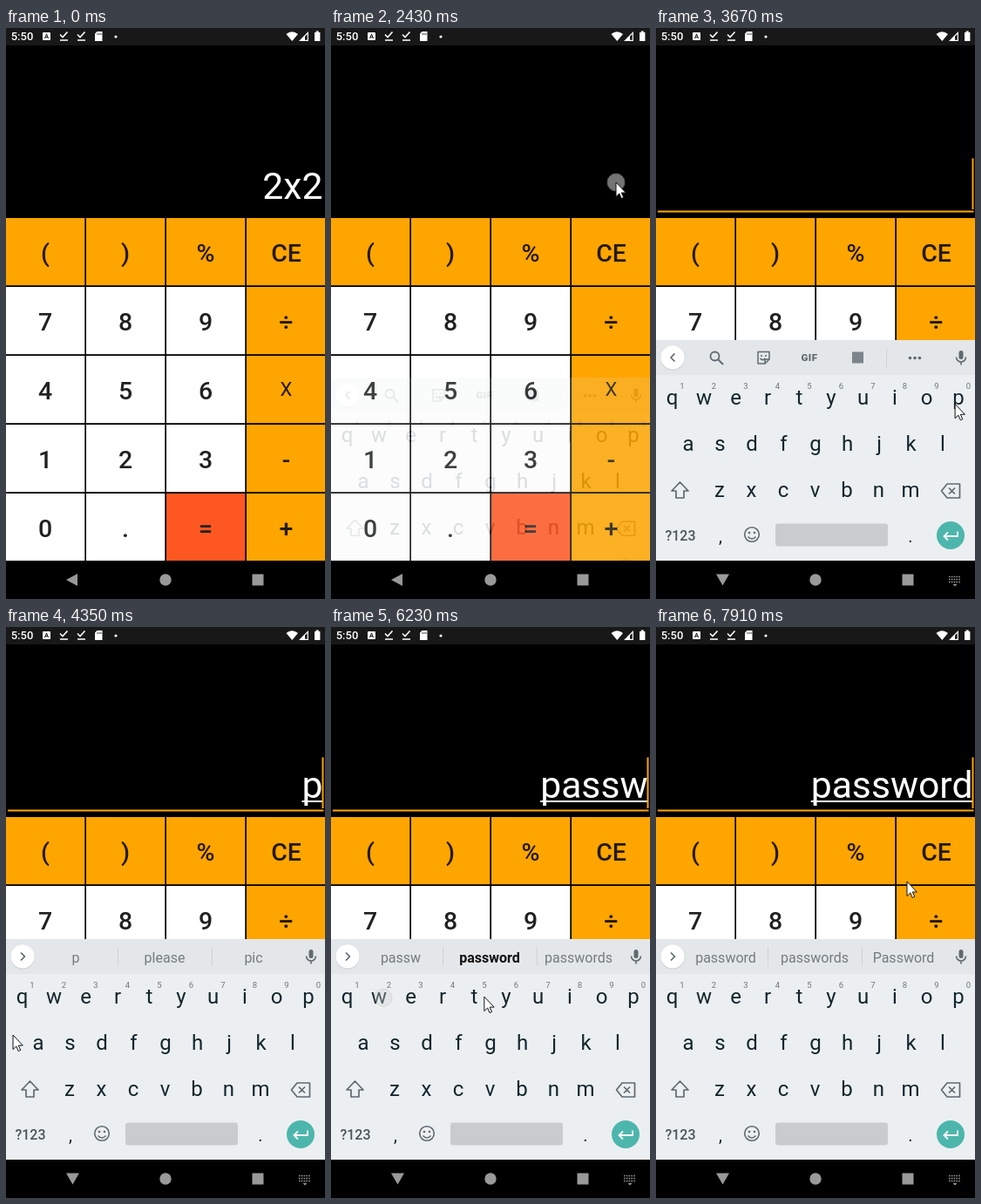
An HTML page for the animation above (8 s loop, 366 by 655 pixels).

```html
<!DOCTYPE html>
<html lang="en">
<head>
<meta charset="utf-8">
<title>Calculator</title>
<style>
html, body { margin: 0; width: 100%; height: 100%; overflow: hidden; background: #000; }
svg { display: block; width: 366px; height: 655px; font-family: Roboto, sans-serif; }
</style>
</head>
<body>
<svg id="stage" viewBox="0 0 366 655"></svg>
<script>
const LOOP = 8000, BLINK = 550, FADE = 450, FOCUS = 2440, RIGHT = 363.5;

const rect = (x, y, w, h, fill, more = '') =>
  `<rect x="${x}" y="${y}" width="${w}" height="${h}" fill="${fill}" ${more}/>`;
const text = (s, x, y, size, fill, more = '') =>
  `<text x="${x}" y="${y}" font-size="${size}" fill="${fill}" text-anchor="middle" ${more}>${s}</text>`;
const circle = (x, y, r, fill, more = '') => `<circle cx="${x}" cy="${y}" r="${r}" fill="${fill}" ${more}/>`;
const path = (d, fill, more = '') => `<path d="${d}" fill="${fill}" ${more}/>`;
const line = (d, color, w, more = '') => path(d, 'none', `stroke="${color}" stroke-width="${w}" ${more}`);
const group = (id, body, more = '') => `<g id="${id}" ${more}>${body}</g>`;

function statusBar() {
  const check = x => line(`M${x - 4} 7.5l3 3 5.500-6M${x - 4} 14h9`, '#fff', 1.6);
  return rect(0, 0, 366, 20, '#181818') +
    text('5:50', 18.5, 14, 13, '#fff', 'font-weight="500"') +
    rect(42, 5, 9, 9, '#fff', 'rx="1"') + text('A', 46.5, 12.300, 7.5, '#181818', 'font-weight="700"') +
    check(66) + check(86) +
    path('M104.500 4H110.500V15H102V6.500Z', '#fff') + line('M105 6v2M107 6v2M109 6v2', '#181818', 0.8) +
    circle(126, 10, 1.6, '#fff') +
    path('M321.500 7Q328 1.500 335 7L328.300 15Z', '#fff') +
    line('M337.500 14.300H346.300V5.500Z', '#fff', 1.2) + path('M337 15L343 9V15Z', '#fff') +
    path('M354 5h1.700v-1.500h3v1.500h1.700v10h-6.400Z', '#fff');
}

function keypad() {
  const rows = ['()%C', '789÷', '456X', '123-', '0.=+'];
  let out = '';
  rows.forEach((row, r) => [...row].forEach((ch, c) => {
    const orange = r === 0 || c === 3;
    const fill = ch === '=' ? '#ff5722' : orange ? '#ffa500' : '#fff';
    const x = c * 92, y = 218 + r * 79, cx = x + (c === 3 ? 45.5 : 45);
    out += rect(x, y, 90.300, 77.200, fill);
    out += ch === 'X'
      ? text('X', cx, y + 204 - 200 + 42, 22, '#231a08')
      : text(ch === 'C' ? 'CE' : ch, cx, y + 50, 28.5, orange ? '#231a08' : '#212121', 'font-weight="500"');
  }));
  return out;
}

function navBar() {
  const grey = '#999';
  return rect(0, 611, 366, 44, '#000') +
    group('backLeft', path('M69 633L82 626V640Z', grey)) +
    group('backDown', path('M69 626.500H84L76.500 639.500Z', grey) +
      line('M336 629.500h14M336 632.500h14M336 635.500h14', grey, 1.7, 'stroke-dasharray="1.6 1.2"') +
      path('M340.500 638h5l-2.500 2.500Z', grey)) +
    circle(183, 633, 6.700, grey) + rect(282.5, 626.5, 13, 13, grey);
}

const INK = '#13262e', ICON = '#5f6a70';
const SLOTS = [80, 182, 284];

function keyboard() {
  let out = rect(0, 358, 366, 254, '#eceff1') + rect(0, 358, 366, 40, '#e4e7e9');
  const letters = (row, x0, y) => [...row].forEach((ch, i) => {
    out += text(ch, x0 + i * 36.5, y, 24, INK);
  });
  letters('qwertyuiop', 18.5, 432);
  letters('asdfghjkl', 37, 485);
  letters('zxcvbnm', 73, 538);
  [...'1234567890'].forEach((n, i) => { out += text(n, 30 + i * 36.5, 414, 9.5, '#6c777c'); });

  const stroke = (d, w = 1.7) => line(d, ICON, w, 'stroke-linejoin="round"');
  out += stroke('M27.500 521L18 531H23V539H32V531H37Z');
  out += stroke('M334 523H348.500V539H334L327.500 531ZM336 527.500l7 7m0-7l-7 7');
  out += text('?123', 28, 587.5, 16, '#4a555b', 'font-weight="500"');
  out += text(',', 74, 590, 20, INK) + text('.', 292, 590, 20, INK);
  out += circle(110, 581, 8.3, 'none', `stroke="${ICON}" stroke-width="1.600"`) +
    circle(107, 579, 1.3, ICON) + circle(113, 579, 1.3, ICON) + stroke('M105.500 583.500Q110 588.500 114.500 583.500', 1.5);
  out += rect(137, 568.5, 129, 26, '#c9cccf', 'rx="3"');
  out += circle(338, 582, 16, '#4db6ac') + line('M346 577.500V583H331M335 578.500L330.500 583L335 587.500', '#fff', 1.8);

  out += circle(19, 379, 13.800, '#cfd3d5') + circle(19, 378, 13.5, '#fff');
  out += rect(347.5, 370, 5, 10, ICON, 'rx="2.5"') + stroke('M344.500 377.500a5.500 5.500 0 0 0 11 0M350 383v3.500', 1.6);

  out += group('tools',
    stroke('M21.500 373.500L17 378L21.500 382.500') +
    circle(67.5, 376.5, 5, 'none', `stroke="${ICON}" stroke-width="1.800"`) + stroke('M71 380l6 6', 2) +
    stroke('M117 371.500H130V380L125 385H117ZM125 385V380H130M119.500 379q3 3.500 5.500 0', 1.5) +
    circle(121, 376, 1, ICON) + circle(126, 376, 1, ICON) +
    text('GIF', 176, 382, 11.5, ICON, 'font-weight="900" letter-spacing="0.5"') +
    rect(225, 371.5, 13, 13, '#7b858a') +
    rect(264, 368, 1, 21, '#cdd2d4') +
    [291.5, 297, 302.5].map(x => circle(x, 378.500, 1.8, ICON)).join(''));

  out += group('words',
    stroke('M17 373.500L21.500 378L17 382.500') +
    rect(128, 367, 1, 22, '#cdd2d4') + rect(236, 367, 1, 22, '#cdd2d4') +
    SLOTS.map((x, i) => text('', x, 384.5, 16, '#747b7f', `id="word${i}"`)).join(''));
  return out;
}

const popup = rect(-19, -84, 38, 106, '#777', 'rx="4" opacity="0.250" transform="translate(0 1.5)"') +
  rect(-18.5, -84, 37, 105, '#c9cbcd', 'rx="3"') +
  text('', -1, -49, 24, '#444b4f', 'id="popChar"') + text('…', 10.5, -39, 9, '#444b4f');

const arrow = path('M0 0V16.500L3.800 12.900L6.200 18.500L8.700 17.400L6.300 12H11.300Z', '#fff',
  'stroke="#111" stroke-width="1" stroke-linejoin="round"');

document.getElementById('stage').innerHTML =
  rect(0, 0, 366, 655, '#000') + statusBar() +
  `<text id="entry" x="${RIGHT}" y="196" font-size="42.700" fill="#fff" text-anchor="end"></text>` +
  rect(0, 199, 0, 2, '#fff', 'id="under"') +
  group('focus', rect(2, 209.5, 362.5, 2, '#ffa500') + rect(362.5, 149.5, 2, 58.5, '#ffa500', 'id="caret"')) +
  keypad() + group('keys', keyboard()) + navBar() +
  group('pop', popup) +
  group('press', circle(0, 0, 14, '#f4ea3e', 'opacity="0.850"') + circle(0, 0, 10, 'none', 'stroke="#d8cd3c" stroke-width="1"')) +
  group('release', circle(0, 0, 10, '#d4d4d4', 'stroke="#a8a8a8" stroke-width="1"')) +
  group('mouse', arrow);

const $ = {};
document.querySelectorAll('[id]').forEach(e => { $[e.id] = e; });
const show = (e, on) => e.setAttribute('display', on ? 'inline' : 'none');
const move = (e, x, y) => e.setAttribute('transform', `translate(${x} ${y})`);

// Pointer stops: time, x, y
const stops = [
  [310, 342, 612], [430, 341, 520], [550, 335, 390], [670, 324, 275], [770, 320, 245], [1770, 320, 244],
  [1960, 324, 205], [2120, 327, 177], [2960, 327, 177], [3180, 304, 255], [3380, 300, 370],
  [3540, 330, 455], [3700, 346, 426], [3900, 346, 426], [4060, 240, 445], [4220, 70, 464],
  [4340, 8, 468], [4470, 8, 468], [4690, 27, 471], [4770, 32, 476], [4890, 32, 477],
  [5020, 75, 479], [5480, 76, 479], [5570, 72, 465], [5700, 61, 428], [5990, 60, 425],
  [6220, 170, 424], [6480, 308, 426], [6700, 309, 426], [6930, 121, 425], [7120, 121, 425],
  [7290, 110, 476], [7480, 110, 477], [7620, 165, 425], [7780, 250, 330], [7900, 288, 292]
];

// Clicks: time down, time up, text afterwards, popup letter, popup x, popup y
const clicks = [
  [1250, 1400, ''], [2180, 2290, ''],
  [3730, 3880, 'p', 'p', 346.5, 424], [4770, 4880, 'pa', 'a', 37, 477],
  [5020, 5110, 'pas', 's', 73.5, 477], [5180, 5260, 'pass', 's', 73.5, 477],
  [5850, 5970, 'passw'], [6570, 6690, 'passwo', 'o', 310.5, 424],
  [6960, 7110, 'passwor', 'r', 128.5, 424], [7310, 7465, 'password', 'd', 110, 477]
];

const guesses = {
  p: 'please pic', pa: 'pay part', pas: 'pass past', pass: 'password passed',
  passw: 'password passwords', passwo: 'password passwords', passwor: 'password passwords',
  password: 'passwords Password'
};

function pointer(t) {
  const i = stops.findIndex(s => s[0] > t);
  if (i < 0) return stops[stops.length - 1].slice(1);
  const [t0, x0, y0] = stops[Math.max(0, i - 1)], [t1, x1, y1] = stops[i];
  const k = t1 > t0 ? (t - t0) / (t1 - t0) : 0;
  return [x0 + (x1 - x0) * k, y0 + (y1 - y0) * k];
}

function draw(t) {
  const last = clicks.filter(c => c[1] <= t).pop();
  const held = clicks.find(c => c[0] <= t && t < c[1]);
  const typed = last ? last[2] : '2x2';

  $.entry.textContent = typed;
  const composing = typed && last;
  show($.under, composing);
  if (composing) {
    const w = $.entry.getComputedTextLength();
    $.under.setAttribute('x', RIGHT - w);
    $.under.setAttribute('width', w);
  }

  const focused = t >= FOCUS;
  show($.focus, focused);
  const since = t - Math.max(FOCUS, last ? last[1] : 0);
  show($.caret, focused && Math.floor(since / BLINK) % 2 === 0);
  show($.backLeft, !focused);
  show($.backDown, focused);

  const left = 1 - Math.min(1, Math.max(0, (t - 2400) / 300));
  show($.keys, left < 1);
  $.keys.setAttribute('opacity', 1 - left ** 1.5);
  move($.keys, 0, 60 * left ** 3);

  show($.tools, !composing);
  show($.words, composing);
  if (composing) {
    [typed, ...guesses[typed].split(' ')].forEach((word, i) => {
      const strong = i === 1 && /^passw(o|or)?$/.test(typed);
      const e = $['word' + i];
      e.textContent = word;
      e.setAttribute('font-weight', strong ? 700 : 400);
      e.setAttribute('fill', strong ? '#111' : '#747b7f');
    });
  }

  show($.pop, held && held[3]);
  if (held && held[3]) {
    $.popChar.textContent = held[3];
    move($.pop, held[4], held[5]);
  }

  const [x, y] = pointer(t);
  show($.mouse, t >= 310);
  move($.mouse, x, y);
  show($.press, held);
  move($.press, x, y);
  const glow = last && !held ? 1 - (t - last[1]) / FADE : 0;
  show($.release, glow > 0);
  if (glow > 0) {
    $.release.setAttribute('opacity', 0.8 * glow);
    move($.release, ...pointer(last[1]));
  }
}

const start = performance.now();
function tick() {
  draw((performance.now() - start) % LOOP);
  requestAnimationFrame(tick);
}
tick();
</script>
</body>
</html>
```
